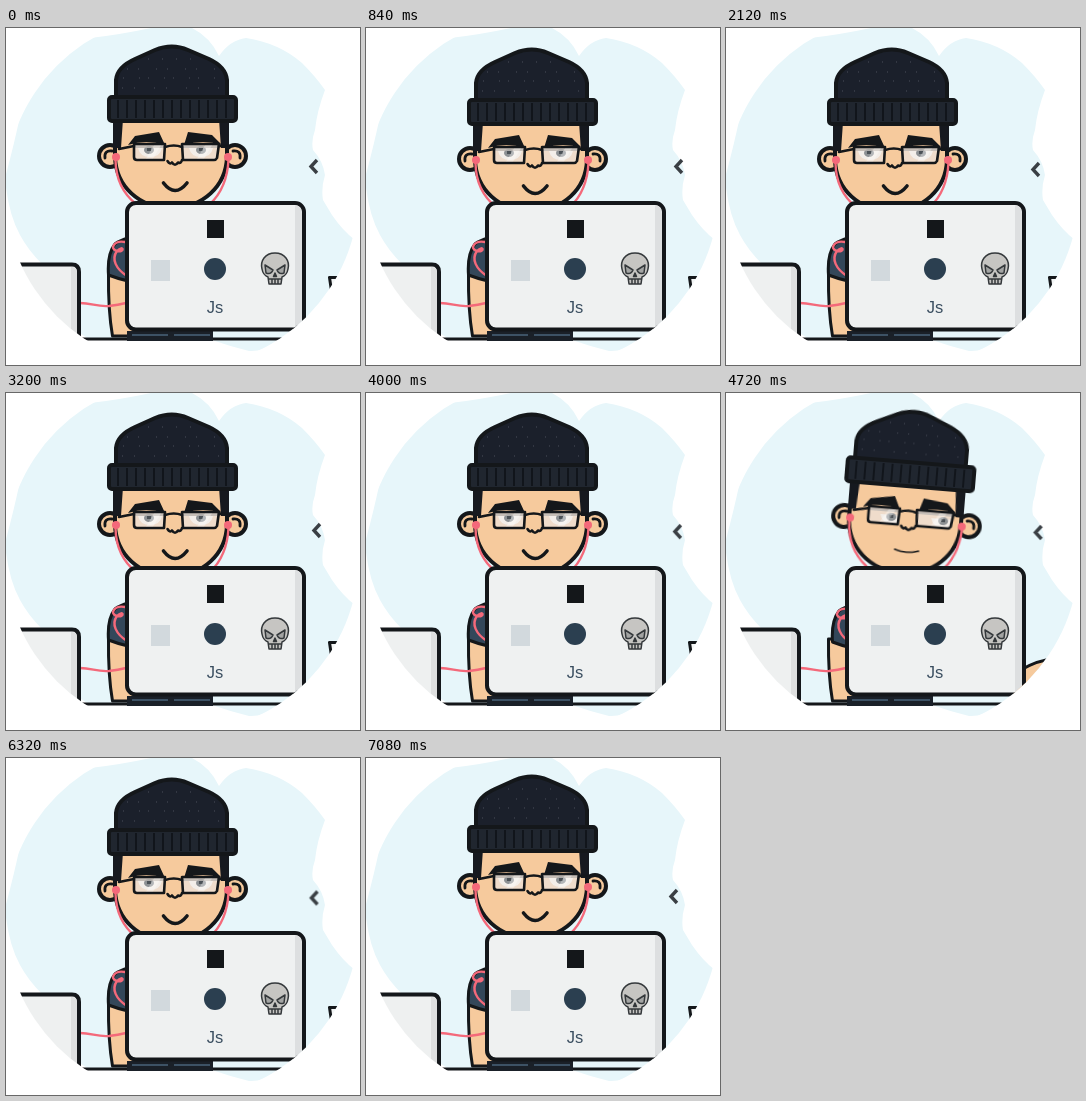
Recreate the animation shown at these times as an HTML page. Size 354 by 337 pixels, loop 7.12 s.

```html
<!DOCTYPE html>
<html lang="en">
<head>
<meta charset="utf-8">
<title>Developer at a laptop</title>
<style>
  html, body { margin: 0; width: 100%; height: 100%; overflow: hidden; background: #fff; }
  svg { display: block; width: 354px; height: 337px; }
  .ink { stroke: #14171a; stroke-width: 4; stroke-linejoin: round; stroke-linecap: round; }
  .thin { stroke-width: 3; }
  .line { fill: none; }
  .skin { fill: #f6ca9d; }
  .wire { fill: none; stroke: #f4697a; stroke-width: 2.4; stroke-linecap: round; }
  .move { animation: 7120ms ease-in-out infinite; }

  #head { animation-name: head; transform-origin: 165px 131px; }
  #eyes { animation-name: eyes; }
  #mouth { animation-name: mouth; }
  #sleeve { animation-name: sleeve; }
  #arm { animation-name: arm; }
  #cup { animation-name: cup; }
  #chevron { animation-name: drift; }

  @keyframes head {
    0%, 99.4%, 100% { transform: translate(0, -3px) rotate(0deg); }
    9%, 61.2%, 76.5%, 91.6% { transform: none; }
    65.8%, 70.5% { transform: translate(14px, -3px) rotate(4.7deg); }
  }
  @keyframes eyes {
    0%, 61.2%, 76.5%, 100% { transform: none; }
    65%, 70.5% { transform: translate(8px, 3px); }
  }
  @keyframes mouth {
    0%, 61.2%, 82.5%, 100% { d: path("M157.5 158Q169 173 181 158"); stroke-width: 3.6px; }
    65%, 71% { d: path("M157 160Q169 164 181 160"); stroke-width: 1.6px; }
    75%, 79% { d: path("M157 160Q169 162 181 160"); stroke-width: 1.6px; }
  }
  @keyframes sleeve {
    0%, 61.2%, 76.5%, 100% { transform: none; }
    65.8%, 70.5% { transform: translate(4px, 2px); }
  }
  @keyframes arm {
    0%, 61.2%, 79.5%, 100% { transform: translate(-56px, 26px); }
    65.8%, 70.5% { transform: none; }
    77.5% { transform: translate(-39px, 17px); }
  }
  @keyframes cup {
    0%, 63%, 75%, 100% { transform: none; }
    65.8%, 70.5% { transform: translate(28px, 0); }
  }
  @keyframes drift {
    0%, 99.4%, 100% { transform: none; }
    11.8% { transform: translate(5px, 0); }
    29.8% { transform: translate(2px, 3px); }
    44.9% { transform: translate(3px, -1px); }
    66.3% { transform: translate(4.5px, 1px); }
    77.5% { transform: translate(1px, 3px); }
  }
</style>
</head>
<body>
<svg viewBox="0 0 354 337">
  <defs>
    <clipPath id="round"><circle cx="176" cy="163" r="177"/></clipPath>
    <clipPath id="desk"><path d="M0 0H354V301H0Z"/></clipPath>
    <clipPath id="lenses"><path d="M128 119h31v16h-31zM176 119h37l-2 16h-34z"/></clipPath>
  </defs>

  <g clip-path="url(#round)">
    <path fill="#e7f6fa" d="M145 0H186Q204 9 213 28Q224 12 240 10Q273 15 296 35Q310 49 319 62Q311 83 309 102Q305 113 307 122Q317 133 319 147Q315 160 317 172L326 187Q337 203 349 212Q338 245 310 282Q290 311 270 313Q257 324 243 323Q223 318 206 312H84Q40 285 36 236Q22 222 14 207Q2 185 -1 150Q8 117 14 88Q24 63 40 42Q58 22 84 10Q112 7 145 0Z"/>

    <g id="cup" class="move">
      <path class="ink thin" fill="#f4f6f6" d="M323.5 249.5H360L354 300H331Z"/>
    </g>

    <g clip-path="url(#desk)">
      <path id="arm" class="ink thin skin move" d="M262 300C282 284 305 267 328 266Q346 266 346 272Q345 280 330 285L296 306Z"/>
    </g>

    <path class="ink thin skin" d="M102.5 246Q102 282 106.5 308H150V246Z"/>
    <g id="sleeve" class="move">
      <path class="ink thin" fill="#33475a" d="M102.5 247Q101 226 109 216Q117 209 150 205V258Q120 254 102.5 247Z"/>
      <path class="wire" d="M119 214C108 212 103 221 111 223C119 225 118 216 111 223C105 231 110 241 121 248"/>
    </g>

    <g id="head" class="move">
      <g class="ink skin">
        <circle cx="104" cy="131" r="11"/>
        <circle cx="229" cy="131" r="11"/>
        <path d="M109 90V132C110 161 133 183 165 183C197 183 220 161 221 132V90Z"/>
      </g>
      <path class="ink line" style="stroke-width:2.8" d="M99 133Q98 125 106 126M234 133Q235 125 227 126"/>
      <path fill="#16191f" d="M107 94H117L115 123H107ZM223 94H213L215 123H223Z"/>

      <g clip-path="url(#lenses)">
        <path fill="#efdccb" d="M126 117h90v20h-90z"/>
        <g id="eyes" class="move">
          <path fill="#f3eee9" d="M132 123h24q-2 9-12 9t-12-9zM183 123h24q-2 9-12 9t-12-9z"/>
          <ellipse cx="143" cy="125" rx="5" ry="4" fill="#8d9194"/>
          <ellipse cx="195" cy="125" rx="5" ry="4" fill="#8d9194"/>
          <path fill="#4c5257" d="M141 123h4v3h-4zM193 123h4v3h-4z"/>
        </g>
        <path fill="#b9b5b0" opacity=".75" d="M126 117h90v6h-90z"/>
        <path fill="#fff" opacity=".35" d="M150 117h7l-12 20h-7zM201 117h7l-12 20h-7z"/>
      </g>
      <path fill="#14171a" d="M122 120L129 111L153 107L159 120Q140 114 122 120ZM216 120L206 110L182 107L178 120Q197 114 216 120Z"/>
      <g class="ink line" style="stroke-width:2.6">
        <path d="M128 119H159L158 135H131Q128 135 128 132ZM176 119H213L211 133Q210 135 208 135H177Z"/>
        <path d="M159 122Q168 119 176 122M128 121L113 124M213 121L221 121"/>
        <path d="M161.5 136Q164 140 166 137.5Q169 142 172 137.5Q175 139 176 135"/>
      </g>
      <path id="mouth" class="ink line move" d="M157.5 158Q169 173 181 158"/>

      <path class="ink" fill="#1b202b" d="M110 76V55Q111 42 129 34L149 25Q166 18 182 25L203 34Q220 42 221 55V76Z"/>
      <g fill="none" stroke="#4a4f5b" stroke-width="1">
        <path stroke-dasharray="1 13" d="M142 34H190"/>
        <path stroke-dasharray="1 10 1 17" d="M121 44H212"/>
        <path stroke-dasharray="1 15 1 8" d="M117 53H216"/>
        <path stroke-dasharray="1 11 1 19" d="M116 63H216"/>
      </g>
      <rect class="ink" fill="#20262f" x="103" y="72" width="127" height="24" rx="3"/>
      <path fill="none" stroke="#11151b" stroke-width="18" stroke-dasharray="2 7" d="M111 84H226"/>

      <path class="wire" d="M109.5 135Q110 163 130 179M222.5 135Q221 163 204 179"/>
      <circle cx="110" cy="132" r="4" fill="#f4697a"/>
      <circle cx="222" cy="132" r="4" fill="#f4697a"/>
    </g>

    <path class="ink thin" d="M70 311H290"/>
    <path fill="#1a2028" d="M121 303H207V313H121Z"/>
    <path fill="none" stroke="#3d5265" stroke-width="2" stroke-dasharray="36 6" d="M126 307H204"/>

    <path class="wire" d="M74 275C86 275 91 279 103 278Q112 277 120 275"/>
    <path class="ink" fill="#eef0f0" d="M-10 236.5H66Q73 236.5 73 244V311H-10Z"/>
    <path fill="#dedfdf" d="M65 239H66Q71 239 71 245V309H65Z"/>

    <rect class="ink" fill="#eff1f1" x="121" y="175" width="177" height="126.5" rx="9"/>
    <path fill="#dddfe0" d="M289 177Q296 178 296 186V291Q296 298 289 299Z"/>

    <rect x="201" y="192" width="17" height="18" fill="#14171a"/>
    <rect x="145" y="232" width="19" height="21" fill="#d2d9dd"/>
    <circle cx="209" cy="241" r="11" fill="#2b3f50"/>
    <text x="209" y="285" text-anchor="middle" font-family="'Liberation Sans', Arial, sans-serif" font-size="16.5" fill="#3a4e60">Js</text>

    <g stroke="#34383b" stroke-width="1.5" stroke-linejoin="round">
      <path fill="#c6c5c2" d="M269 225C259 225 254 233 256 241Q257 247 262 249L263 256H275L276 249Q281 247 282 241C284 233 279 225 269 225Z"/>
      <path fill="#a3a4a3" d="M259 237L267 242Q265 247 260 245ZM279 237L271 242Q273 247 278 245Z"/>
      <path fill="#1d2022" d="M269 245L267.5 248.5H270.5Z"/>
      <path fill="none" d="M263 251H275M266 251V256M269 251V256M272 251V256"/>
    </g>
  </g>

  <path id="chevron" class="move" fill="none" stroke="#3a3f44" stroke-width="3.4" d="M311 132L305 138.5L311 145"/>
</svg>
</body>
</html>
```
